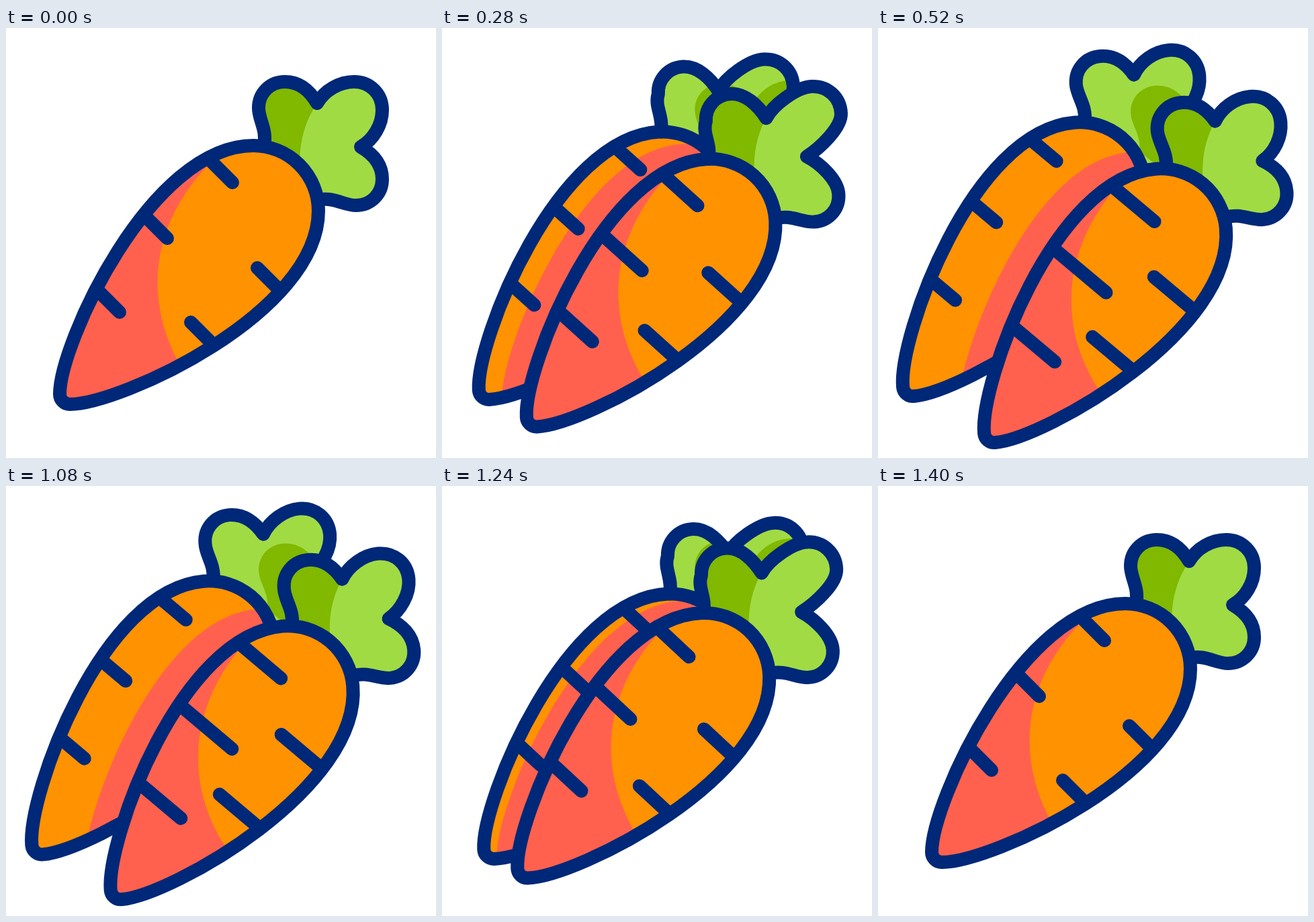
Write an HTML page with a canvas that moves like this. It is 640 px wide and 640 px high and loops after 1.48 s.

```html
<!DOCTYPE html>
<html lang="en">
<head>
<meta charset="utf-8">
<title>Carrots</title>
<style>
  html, body { margin: 0; width: 100%; height: 100%; overflow: hidden; background: #fff; }
  canvas { display: block; width: 100vw; height: 100vh; }
</style>
</head>
<body>
<canvas id="stage" width="640" height="640"></canvas>
<script>
const ctx = document.getElementById('stage').getContext('2d');
const NAVY = '#002878', ORANGE = '#ff9200', RED = '#ff614e', LIGHT = '#a1db43', DARK = '#81b800';

const LOOP = 1480, STEP = 40, MOVE = 360, OPEN_AT = 120, CLOSE_AT = 1080;

const body = new Path2D(
  'M80 545C80 470 215 175 368 175A97 97 0 0 1 465 272C465 425 170 560 95 560A15 15 0 0 1 80 545Z');
const bodyShade = new Path2D('M310 195L300 205C210 300 210 410 256 496L60 640L0 640L0 0Z');
const leafShade = new Path2D('M463 112C448 135 438 160 437 200L340 200L340 60L463 60Z');

// The leaf is symmetric about the carrot's axis: one half is drawn, the other mirrored.
const halfLeaf = [
  [384, 175], [389, 152], [376, 137], [376, 119], [376, 97], [393, 80], [415, 80],
  [437, 80], [452, 93], [463, 112], [474, 93], [496, 80], [518, 80], [542, 80]
];
const leafPoints = [...halfLeaf, ...halfLeaf.map(([x, y]) => [640 - y, 640 - x]).reverse()];

// Each part of the leaf, up to a point index, moves as one when the leaf bulges.
const leafParts = [
  { end: 3, shift: [-14, 0] },
  { end: 8, shift: [-7, 0] },
  { end: 11, shift: [-4, 7] },
  { end: 17, shift: [11, -5] },
  { end: 20, shift: [-12, 2] },
  { end: 28, shift: [1, 13] }
];

// Free end of each tick and its growth along the diagonal.
const ticks = [[337, 230, 23], [240, 313, 39], [169, 423, 25], [374, 357, -22], [275, 438, -22]];
const TICK_SIZE = 31;

function leafPath(bulge) {
  const pts = leafPoints.map(([x, y], i) => {
    const [dx, dy] = leafParts.find(part => i < part.end).shift;
    return [x + dx * bulge, y + dy * bulge];
  });
  const path = new Path2D();
  path.moveTo(...pts[0]);
  for (let i = 1; i < pts.length; i += 3) {
    path.bezierCurveTo(...pts[i], ...pts[i + 1], ...pts[i + 2]);
  }
  return path;
}

// Shift the carrot and turn it about its tip.
function place(dx, dy, p) {
  return new DOMMatrix().translate(84 + dx, 556 + dy).rotate(-5 * p).translate(-84, -556);
}

function fill(path, color) {
  ctx.fillStyle = color;
  ctx.fill(path);
}

function fillInside(area, path, color, matrix = ctx.getTransform()) {
  ctx.save();
  ctx.clip(area);
  ctx.setTransform(matrix);
  fill(path, color);
  ctx.restore();
}

function strokeOutline(leaf, growth) {
  const lines = new Path2D();
  for (const [x, y, grow] of ticks) {
    const back = Math.sign(grow) * TICK_SIZE;
    lines.moveTo(x - back, y - back);
    lines.lineTo(x + grow * growth, y + grow * growth);
  }
  ctx.strokeStyle = NAVY;
  ctx.lineWidth = 20;
  ctx.lineCap = ctx.lineJoin = 'round';
  for (const path of [leaf, lines, body]) ctx.stroke(path);
}

function drawBack(p, bulge) {
  const leaf = leafPath(bulge);
  ctx.setTransform(place(-42 * p, -11 * p, p));
  fill(leaf, LIGHT);
  fillInside(leaf, leafPath(0), DARK, place(39.5 * p, 33 * p, p));
  fill(body, ORANGE);
  fillInside(body, body, RED, place(39.5 * p - 14 * bulge, 33 * p - 8 * bulge, p));
  strokeOutline(leaf, 0);
}

function drawFront(p, bulge) {
  const leaf = leafPath(bulge);
  ctx.setTransform(place(79 * p, 58 * p, p));
  fill(leaf, LIGHT);
  fillInside(leaf, leafShade, DARK);
  fill(body, ORANGE);
  fillInside(body, bodyShade, RED);
  strokeOutline(leaf, p);
}

// Sine ease in and out, held for each step.
function ease(t) {
  const held = (Math.floor(t / STEP) + 1) * STEP;
  const u = Math.min(1, Math.max(0, held / MOVE));
  return (1 - Math.cos(Math.PI * u)) / 2;
}

function render() {
  const t = performance.now() % LOOP;
  const p = ease(t - OPEN_AT) - ease(t - CLOSE_AT);
  const bulge = 4 * p * (1 - p);
  ctx.resetTransform();
  ctx.fillStyle = '#fff';
  ctx.fillRect(0, 0, 640, 640);
  if (p > 0) drawBack(p, bulge);
  drawFront(p, bulge);
  requestAnimationFrame(render);
}
render();
</script>
</body>
</html>
```
